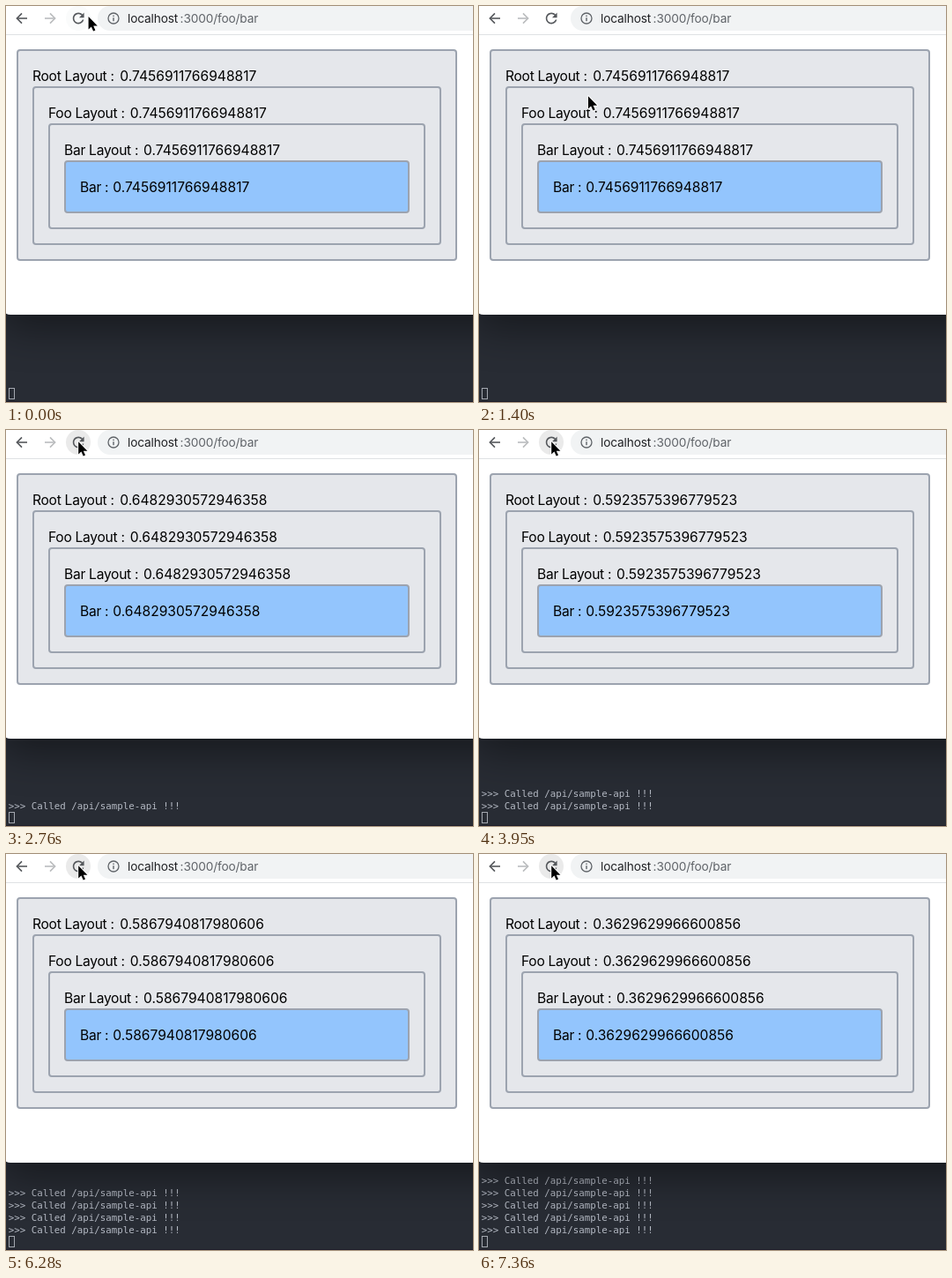
Recreate the animation shown at these times as an HTML page with a canvas. Size 530 by 449 pixels, loop 8000 ms.

```html
<!DOCTYPE html>
<html lang="en">
<head>
<meta charset="utf-8">
<title>Nested layouts</title>
<style>
html, body { margin: 0; width: 100%; height: 100%; overflow: hidden; background: #282c34; }
canvas { display: block; width: 530px; height: 449px; }
</style>
</head>
<body>
<canvas id="stage"></canvas>
<script>
const W = 530, H = 449, LOOP = 8000;
const UI = 'Inter, Roboto, sans-serif';
const MONO = '"DejaVu Sans Mono", "Liberation Mono", monospace';

const canvas = document.getElementById('stage');
const ctx = canvas.getContext('2d');
const ratio = window.devicePixelRatio || 1;
canvas.width = W * ratio;
canvas.height = H * ratio;

// Each reload logs a line and shows a new number.
const reloads = [
  { log: 2760, show: 2760, value: '0.6482930572946358' },
  { log: 3950, show: 3950, value: '0.5923575396779523' },
  { log: 5030, show: 5030, value: '0.5272688912896935' },
  { log: 6280, show: 6280, value: '0.5867940817980606' },
  { log: 7300, show: 7360, value: '0.3629629966600856' }
];
const firstValue = '0.7456911766948817';

const layers = [
  { label: 'Root Layout :', valueX: 129.3 },
  { label: 'Foo Layout :', valueX: 140.8 },
  { label: 'Bar Layout :', valueX: 156 },
  { label: 'Bar :', valueX: 121.2 }
];

const reloadIcon = new Path2D('M17.65 6.35C16.2 4.9 14.21 4 12 4c-4.42 0-7.99 3.58-7.99 8s3.57 8 7.99 8c3.73 0 6.84-2.55 7.73-6h-2.08c-.82 2.33-3.04 4-5.65 4-3.31 0-6-2.69-6-6s2.69-6 6-6c1.66 0 3.14.69 4.22 1.78L13 11h7V4z');
const pointer = new Path2D('M0 0V14.4L3.2 11.4L5.5 16.4L7.8 15.4L5.6 10.5H10.2Z');

const clamp = v => Math.max(0, Math.min(1, v));
const ease = p => p * p * (3 - 2 * p);
const mix = (a, b, p) => a + (b - a) * p;

// Progress in equal jumps; the first jump falls on the start time.
function stepped(t, start, end, count) {
  if (t < start) return 0;
  const gap = (end - start) / (count - 1);
  return clamp((Math.floor((t - start) / gap + 1e-6) + 1) / count);
}

function text(str, x, y, font, color, spacing = 0) {
  ctx.font = font;
  ctx.letterSpacing = spacing + 'px';
  ctx.fillStyle = color;
  ctx.fillText(str, x, y);
}

function line(points, color, width) {
  ctx.beginPath();
  points.forEach(([x, y]) => ctx.lineTo(x, y));
  ctx.strokeStyle = color;
  ctx.lineWidth = width;
  ctx.stroke();
}

function roundRect(x, y, w, h, r) {
  ctx.beginPath();
  ctx.roundRect(x, y, w, h, r);
}

function disc(x, y, r, color) {
  ctx.beginPath();
  ctx.arc(x, y, r, 0, Math.PI * 2);
  ctx.fillStyle = color;
  ctx.fill();
}

function drawTerminal(t) {
  ctx.fillStyle = '#282c34';
  ctx.fillRect(0, 0, W, H);
  const count = reloads.filter(r => t >= r.log).length;
  for (let i = 0; i < count; i++) {
    text('>>> Called /api/sample-api !!!', 2.8, 430 - 14 * i, '10.8px ' + MONO, '#b4b9c3');
  }
  ctx.strokeStyle = '#a4a8b0';
  ctx.lineWidth = 1;
  ctx.strokeRect(3.5, 433.5, 6, 12);
  ctx.fillStyle = '#1f1d2a';
  ctx.fillRect(0, 448, W, 1);
}

function drawWindow() {
  ctx.save();
  ctx.shadowColor = 'rgba(0, 0, 0, 0.42)';
  ctx.shadowBlur = 46 * ratio;
  ctx.shadowOffsetY = 16 * ratio;
  roundRect(-5, -60, W + 80, 410, 10);
  ctx.fillStyle = '#fff';
  ctx.fill();
  ctx.restore();
}

function navArrow(x, dir, color) {
  const tip = x + dir * 5.6;
  line([[x - dir * 6, 14], [tip, 14]], color, 1.6);
  line([[x, 8.4], [tip, 14], [x, 19.6]], color, 1.6);
}

function drawToolbar(hover) {
  ctx.fillStyle = '#dfe1e4';
  ctx.fillRect(0, 32, W, 1);
  roundRect(104, 0, W, 28, 14);
  ctx.fillStyle = '#f1f3f4';
  ctx.fill();

  navArrow(18, -1, '#55585c');
  navArrow(50, 1, '#babcbe');
  if (hover > 0) disc(82, 14, 14, `rgba(60, 64, 67, ${0.11 * hover})`);

  ctx.save();
  ctx.translate(72.6, 4.4);
  ctx.scale(0.8, 0.8);
  ctx.fillStyle = '#55585c';
  ctx.fill(reloadIcon);
  ctx.restore();

  ctx.beginPath();
  ctx.arc(122, 14, 6, 0, Math.PI * 2);
  ctx.strokeStyle = '#5f6368';
  ctx.lineWidth = 1.3;
  ctx.stroke();
  ctx.fillStyle = '#5f6368';
  ctx.fillRect(121.3, 10.6, 1.4, 1.4);
  ctx.fillRect(121.3, 13.2, 1.4, 4);

  const font = '13.7px ' + UI;
  text('localhost', 138, 19, font, '#202124', -0.15);
  text(':3000/foo/bar', 197.6, 19, font, '#5f6368', -0.15);
}

function drawLayers(value) {
  const font = '15.6px ' + UI;
  layers.forEach(({ label, valueX }, i) => {
    const x = 12 + 18 * i, y = 49 + 42 * i;
    const w = 500 - 36 * i, h = 240 - 60 * i;
    const inner = i === 3;
    roundRect(x + 1, y + 1, w - 2, h - 2, 3);
    ctx.fillStyle = inner ? '#93c5fd' : '#e5e7eb';
    ctx.fill();
    ctx.strokeStyle = '#9ca3af';
    ctx.lineWidth = 2;
    ctx.stroke();
    text(label, x + 18, y + 36, font, '#000', -0.28);
    text(value, valueX, y + 36, font, '#000');
  });
}

function drawPointer(x, y) {
  ctx.save();
  ctx.translate(x, y);
  ctx.lineJoin = 'round';
  ctx.strokeStyle = '#fff';
  ctx.lineWidth = 2;
  ctx.stroke(pointer);
  ctx.fillStyle = '#000';
  ctx.fill(pointer);
  ctx.restore();
}

function drawIBeam(x, y) {
  const bars = [
    [[x, y - 6], [x, y + 6]],
    [[x - 3, y - 7], [x - 1.2, y - 7], [x, y - 6], [x + 1.2, y - 7], [x + 3, y - 7]],
    [[x - 3, y + 7], [x - 1.2, y + 7], [x, y + 6], [x + 1.2, y + 7], [x + 3, y + 7]],
    [[x - 1.5, y + 2.5], [x + 1.5, y + 2.5]]
  ];
  bars.forEach(b => line(b, 'rgba(255, 255, 255, 0.8)', 2.6));
  bars.forEach(b => line(b, '#000', 1.1));
}

function drawCursor(t) {
  const back = stepped(t, 1110, 1860, 14);
  if (t < 690) {
    const p = ease(stepped(t, 110, 450, 6));
    drawPointer(mix(93.6, 150, p), mix(12, 151.5, p));
  } else if (back < 3 / 14) {
    const p = ease(back);
    drawIBeam(mix(152.5, 82, p), mix(160, 13, p));
  } else {
    const p = ease(back);
    drawPointer(mix(151, 82.2, p), mix(160, 13.2, p));
  }
}

function hoverAt(t) {
  if (t < 1000) return 0.2 * (1 - clamp((t - 110) / 140));
  return clamp((t - 1640) / 200);
}

function draw(t) {
  const shown = reloads.filter(r => t >= r.show).pop();
  ctx.setTransform(ratio, 0, 0, ratio, 0, 0);
  drawTerminal(t);
  drawWindow();
  drawToolbar(hoverAt(t));
  drawLayers(shown ? shown.value : firstValue);
  drawCursor(t);
}

const begin = performance.now();
function tick() {
  draw((performance.now() - begin) % LOOP);
  requestAnimationFrame(tick);
}
tick();
</script>
</body>
</html>
```
